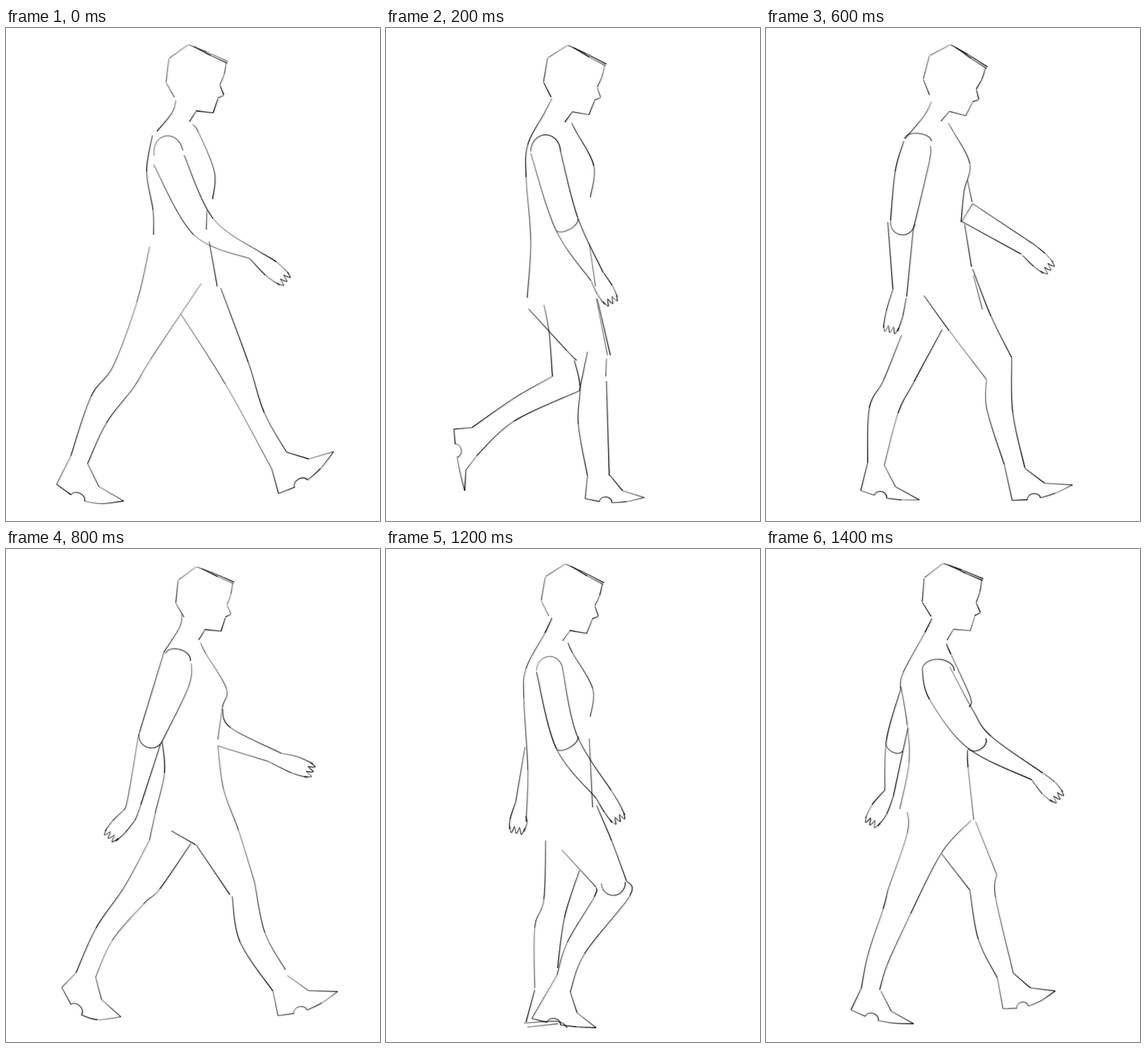
Write an HTML page with a canvas that moves like this. It is 652 px wide and 859 px high and loops after 1.6 s.

```html
<!DOCTYPE html>
<html lang="en">
<head>
<meta charset="utf-8">
<title>Walk cycle</title>
<style>
html, body { margin: 0; width: 100%; height: 100%; overflow: hidden; background: #fff; }
canvas { display: block; }
</style>
</head>
<body>
<canvas id="stage" width="652" height="859"></canvas>
<script>
const ctx = document.getElementById('stage').getContext('2d');
const STEP = 200;
let seed = 1;
const rand = () => (seed = seed * 16807 % 2147483647) / 2147483647;

function trace(pts, off, width, alpha) {
  ctx.lineWidth = width;
  ctx.strokeStyle = `rgba(0,0,0,${alpha})`;
  ctx.beginPath();
  for (const [x, y] of pts) ctx.lineTo(x + off, y + off / 2);
  ctx.stroke();
}

// One pen stroke: soft shade on one side, core darkening to one end.
function brush(pts) {
  const force = 0.8 + 0.45 * rand();
  const n = pts.length - 1;
  trace(pts, 1, 4.2, 0.07 * force);
  trace(pts, 0.6, 2.6, 0.12 * force);
  for (let i = 0; i < n; i++) {
    const t = (i + 0.5) / n;
    trace([pts[i], pts[i + 1]], 0, (0.9 + 0.5 * t) * force, (0.5 + 0.25 * t) * force);
  }
}

// Smooth chain through x, y pairs; each span is its own stroke.
const spline = (a, b, c, d, t) =>
  b + 0.5 * t * (c - a + t * (2 * a - 5 * b + 4 * c - d + t * (3 * (b - c) + d - a)));

function line(...v) {
  const last = v.length / 2 - 1;
  const at = (i, j) => v[2 * Math.max(0, Math.min(last, i)) + j];
  for (let i = 0; i < last; i++) {
    const len = Math.hypot(at(i + 1, 0) - at(i, 0), at(i + 1, 1) - at(i, 1));
    const n = Math.max(2, Math.ceil(len / 5));
    const pts = [];
    for (let k = 0; k <= n; k++) {
      pts.push([0, 1].map(j => spline(at(i - 1, j), at(i, j), at(i + 1, j), at(i + 2, j), k / n)));
    }
    brush(pts);
  }
}

// Half ellipse from one point to the other, h high on the left side.
function arc(x1, y1, x2, y2, h) {
  const dx = (x2 - x1) / 2, dy = (y2 - y1) / 2, len = Math.hypot(dx, dy);
  const pts = [];
  for (let k = 0; k <= 14; k++) {
    const a = Math.PI * k / 14, c = 1 - Math.cos(a), s = Math.sin(a) * h / len;
    pts.push([x1 + dx * c + dy * s, y1 + dy * c - dx * s]);
  }
  brush(pts);
}

function head(x, y, turn, size = 1) {
  ctx.save();
  ctx.translate(x, y);
  ctx.rotate(turn * Math.PI / 180);
  ctx.scale(size, size);
  line(0, 0, -32, 24);
  line(-33, 25, -37, 66);
  line(-37, 67, -22, 92);
  line(1, 0, 33, 12, 70, 28);
  line(10, 3, 40, 18, 69, 31);
  line(67, 31, 64, 50, 57, 69);
  line(57, 70, 64, 86);
  line(64, 87, 54, 92);
  line(54, 93, 46, 118);
  line(46, 118, 16, 115);
  line(16, 116, 5, 134);
  ctx.restore();
}

// Two sides from the wrist to the knuckles at x, y, then curled fingers.
function hand(x1, y1, x2, y2, x, y) {
  const mx = (x1 + x2) / 2, my = (y1 + y2) / 2, len = Math.hypot(x - mx, y - my);
  const dx = (x - mx) / len, dy = (y - my) / len;
  const side = Math.sign((x2 - x1) * dy - (y2 - y1) * dx) || 1;
  const at = (u, w) => [mx + dx * u + dy * side * w, my + dy * u - dx * side * w];
  for (const [w, px, py] of [[-1, x1, y1], [1, x2, y2]]) {
    line(px, py, ...at(len * 0.55, w * 15), ...at(len, w * 13));
  }
  for (let k = 0; k < 3; k++) {
    const w = -13 + k * 9;
    line(...at(len - 4, w), ...at(len + 6, w + 4), ...at(len - 6, w + 8));
  }
}

// Back ankle, heel, toe, front ankle; sag bends the sole.
function foot(bx, by, hx, hy, tx, ty, fx, fy, sag) {
  const dx = tx - hx, dy = ty - hy, len = Math.hypot(dx, dy);
  const sole = u => {
    const s = Math.sin(Math.PI * u) * sag / len;
    return [hx + dx * u - dy * s, hy + dy * u + dx * s];
  };
  line(bx, by, hx, hy);
  line(...sole(0), ...sole(0.24));
  arc(...sole(0.24), ...sole(0.45), 9);
  line(...sole(0.45), ...sole(0.7), ...sole(1));
  const ex = tx - fx, ey = ty - fy;
  const ix = fx + ex * 0.47 - ey * 0.15, iy = fy + ey * 0.47 + ex * 0.15;
  line(fx, fy, ix, iy);
  line(ix, iy, tx, ty);
}

function shift(dx, part) {
  ctx.save();
  ctx.translate(dx, 0);
  part();
  ctx.restore();
}

function trailing() {
  line(257, 482, 266, 530, 272, 607);
  line(272, 607, 205, 645, 132, 696);
  line(333, 564, 319, 632);
  line(319, 632, 205, 685, 140, 745);
  foot(132, 696, 100, 699, 119, 806, 140, 745, 3);
}

function planted() {
  line(266, 489, 333, 562, 350, 579);
  line(346, 579, 356, 624, 353, 690, 369, 780);
  line(384, 470, 404, 570);
  line(386, 472, 409, 570);
  line(402, 576, 401, 607);
  line(402, 615, 407, 780);
  foot(369, 780, 365, 820, 468, 818, 408, 779, 8);
}

function passing() {
  line(270, 508, 267, 610, 251, 660, 251, 765);
  line(329, 560, 303, 642, 291, 730);
  line(251, 768, 236, 824);
  line(232, 826, 290, 823, 308, 834);
  line(238, 833, 292, 827);
  line(359, 447, 385, 508, 411, 578);
  line(411, 578, 417, 604, 338, 705, 313, 772);
  arc(367, 583, 409, 580, -22);
  line(298, 524, 358, 589);
  line(358, 590, 355, 606, 308, 685, 290, 742);
  foot(290, 742, 246, 818, 358, 834, 313, 772, 4);
}

function stride() {
  head(317, 29, 1);
  line(296, 126, 289, 148, 263, 180);
  line(255, 187, 245, 250, 256, 317, 257, 360);
  line(325, 168, 335, 181, 363, 250, 360, 298);
  line(350, 318, 349, 351);
  line(354, 372, 368, 450);
  arc(258, 222, 308, 213, 30);
  line(310, 221, 361, 332, 442, 390);
  line(257, 238, 327, 360, 425, 402);
  hand(442, 390, 425, 402, 485, 438);
  line(250, 381, 228, 477, 187, 588, 148, 642, 113, 745);
  line(340, 445, 252, 577, 223, 625, 175, 688, 142, 759);
  foot(113, 745, 88, 795, 205, 824, 142, 759, 17);
  line(374, 453, 422, 582, 450, 670, 489, 739);
  line(305, 499, 382, 620, 463, 768);
  foot(463, 768, 475, 811, 571, 738, 489, 739, 12);
}

function settle() {
  head(316, 30, 4);
  line(289, 122, 276, 148, 247, 203, 244, 260, 252, 370, 246, 470);
  line(323, 165, 331, 180, 362, 240, 356, 295);
  line(354, 375, 365, 450);
  arc(252, 215, 304, 215, 29);
  line(304, 215, 334, 330, 378, 425);
  line(252, 218, 296, 352, 357, 440);
  arc(296, 352, 334, 332, -10);
  hand(378, 425, 357, 440, 392, 475);
  shift(18, trailing);
  shift(-18, planted);
}

function pass() {
  head(317, 24, 10);
  line(287, 120, 269, 147, 243, 197, 240, 240);
  line(314, 160, 323, 179, 357, 230, 354, 265, 347, 317);
  line(242, 210, 249, 375);
  line(249, 375, 241, 440);
  line(241, 440, 275, 491);
  line(353, 322, 361, 407, 359, 447);
  arc(244, 200, 293, 203, 17);
  line(293, 203, 290, 335, 301, 418, 309, 465);
  line(245, 200, 246, 345, 284, 462);
  arc(249, 325, 290, 318, -22);
  hand(284, 462, 309, 467, 290, 518);
  line(355, 266, 369, 355, 401, 428);
  line(361, 407, 384, 433);
  hand(401, 428, 384, 433, 412, 482);
  passing();
}

function reach() {
  head(321, 29, 9);
  line(288, 128, 276, 152, 242, 193);
  line(317, 165, 326, 180, 355, 236, 345, 285, 340, 338);
  line(351, 265, 359, 303);
  line(346, 342, 358, 416);
  arc(241, 192, 288, 197, 11);
  line(240, 197, 225, 250, 217, 335);
  line(286, 205, 285, 230, 258, 345);
  arc(217, 335, 259, 342, -22);
  line(212, 338, 221, 455);
  line(257, 345, 245, 468);
  hand(221, 455, 244, 470, 217, 525);
  line(360, 306, 467, 377);
  line(341, 337, 445, 394);
  line(341, 337, 360, 306);
  hand(467, 377, 447, 396, 492, 418);
  line(236, 535, 205, 613, 180, 662, 177, 757);
  line(307, 525, 258, 616, 230, 671, 206, 762);
  foot(177, 757, 165, 806, 267, 822, 206, 762, 6);
  line(360, 420, 392, 502, 428, 574);
  line(428, 574, 430, 670, 451, 766);
  line(361, 430, 377, 490);
  line(275, 466, 319, 527, 384, 612);
  line(384, 612, 385, 665, 415, 760);
  foot(415, 760, 429, 823, 534, 796, 451, 767, 8);
}

function counterStride() {
  head(331, 31, 0, 0.95);
  line(306, 113, 303, 135, 275, 180);
  line(339, 163, 348, 182, 384, 243, 377, 276, 369, 332);
  line(369, 342, 379, 418, 405, 490, 433, 580);
  line(272, 336, 276, 390, 260, 460, 250, 507);
  arc(278, 182, 321, 195, 14);
  line(275, 180, 233, 318);
  line(323, 199, 318, 240, 272, 335);
  arc(233, 318, 272, 335, -20);
  line(231, 322, 212, 435, 205, 455);
  line(269, 340, 235, 445, 225, 472);
  hand(205, 455, 225, 472, 182, 500);
  line(377, 278, 391, 311, 480, 356);
  line(369, 343, 457, 370);
  hand(480, 356, 457, 370, 530, 386);
  line(250, 507, 207, 587, 157, 660, 122, 738);
  line(322, 513, 268, 592, 240, 618, 185, 682, 156, 746);
  foot(122, 738, 97, 764, 200, 815, 156, 746, 28);
  line(288, 491, 330, 515);
  line(331, 515, 390, 602);
  line(394, 605, 408, 685, 465, 770);
  line(433, 580, 451, 668, 487, 733);
  foot(465, 770, 474, 813, 578, 771, 490, 743, 10);
}

function counterSettle() {
  head(316, 31, -1);
  line(284, 148, 255, 203, 246, 250, 249, 295);
  line(324, 165, 330, 181, 371, 240, 360, 296, 360, 343);
  line(362, 347, 367, 395, 384, 445);
  line(366, 375, 383, 465);
  arc(280, 193, 328, 203, 16);
  line(300, 187, 262, 265, 242, 335);
  line(328, 203, 318, 255, 288, 350);
  arc(242, 335, 286, 350, -16);
  line(242, 340, 247, 458);
  line(284, 350, 268, 465);
  hand(247, 458, 267, 467, 216, 512);
  line(360, 345, 428, 392);
  line(364, 387, 405, 404);
  hand(428, 392, 405, 404, 460, 436);
  trailing();
  planted();
}

function counterPass() {
  head(312, 26, 4);
  line(289, 120, 277, 146, 244, 208, 240, 260, 247, 385, 244, 475);
  line(317, 163, 325, 181, 360, 243, 356, 292);
  line(354, 330, 360, 450);
  arc(262, 212, 308, 212, 25);
  line(308, 212, 333, 325, 392, 420);
  line(262, 214, 297, 348, 366, 434);
  arc(297, 348, 334, 326, -10);
  hand(392, 420, 366, 434, 405, 470);
  line(242, 345, 226, 440);
  hand(226, 440, 243, 465, 228, 490);
  shift(8, passing);
}

function counterReach() {
  head(308, 25, -1);
  line(289, 121, 277, 145, 239, 215, 234, 243);
  line(314, 165, 322, 183, 356, 258, 354, 275);
  line(235, 240, 246, 306, 249, 372, 233, 453);
  line(246, 458, 246, 495, 212, 595);
  line(351, 350, 352, 380, 362, 472);
  arc(272, 210, 328, 212, 19);
  line(272, 210, 285, 262, 352, 347, 463, 402);
  line(320, 205, 360, 280, 392, 326, 482, 390);
  arc(352, 347, 383, 330, -12);
  hand(482, 390, 463, 402, 508, 432);
  line(235, 243, 210, 332, 207, 420);
  arc(210, 332, 238, 352, -12);
  line(247, 312, 222, 430);
  hand(207, 420, 222, 430, 184, 476);
  line(212, 595, 204, 627, 178, 705, 166, 765);
  line(357, 473, 306, 529, 252, 635);
  line(252, 635, 212, 722, 198, 768);
  foot(166, 765, 148, 803, 257, 827, 200, 770, 8);
  line(306, 531, 355, 594);
  line(355, 594, 370, 680, 403, 747);
  line(365, 475, 402, 567);
  line(402, 567, 400, 607, 431, 739);
  foot(403, 747, 413, 801, 504, 770, 431, 739, 10);
}

const poses = [stride, settle, pass, reach, counterStride, counterSettle, counterPass, counterReach];

function draw(i) {
  seed = 77 + i * 991;
  ctx.fillStyle = '#fff';
  ctx.fillRect(0, 0, 652, 859);
  ctx.lineJoin = 'round';
  poses[i]();
}

let shown = -1;
const start = performance.now();
function tick() {
  const i = Math.floor((performance.now() - start) / STEP) % poses.length;
  if (i !== shown) draw(shown = i);
  requestAnimationFrame(tick);
}
tick();
</script>
</body>
</html>
```
